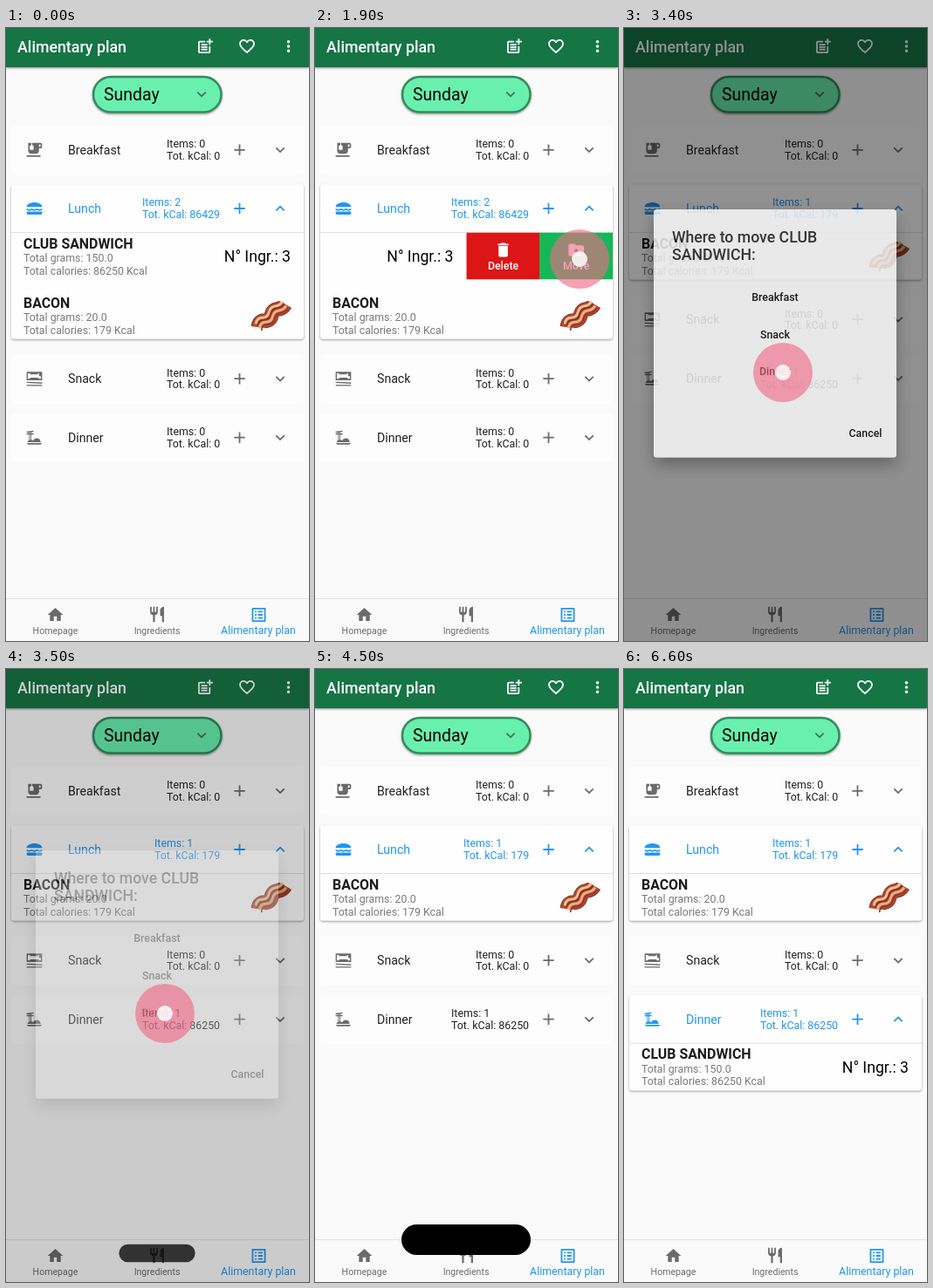
These frames come from a looping animation (347x703 px, 6.7 s). An HTML page:

```html
<!DOCTYPE html>
<html lang="en">
<head>
<meta charset="utf-8">
<title>Alimentary plan</title>
<style>
  html, body { margin: 0; width: 100%; height: 100%; overflow: hidden; background: #fafafa; }
  svg { display: block; }
  text { font-family: Roboto, sans-serif; font-size: 12.37px; fill: currentColor; }
  .medium { font-weight: 500; }
  .name { font-weight: 700; font-size: 15.9px; fill: #1c1c1c; }
  .big { font-size: 17.67px; }
  .label { font-size: 14.14px; }
  .note { fill: #7a7a7a; }
  .nav { font-size: 10.6px; }
  .mid { text-anchor: middle; }
  .end { text-anchor: end; }
</style>
</head>
<body>
<svg id="stage" width="347" height="703" viewBox="0 0 347 703"></svg>
<script>
const LOOP = 6700, STEP = 100, ROW = 68;
const BLUE = '#2196f3', GREY = '#6b6b6b', DARK = '#212121';

const PATHS = {
  home: 'M10 20v-6h4v6h5v-8h3L12 3 2 12h3v8z',
  cutlery: 'M11 9H9V2H7v7H5V2H3v7c0 2.12 1.66 3.84 3.75 3.97V22h2.5v-9.03C11.34 12.84 13 11.12 13 9V2h-2zM16 6v8h2.5v8H21V2c-2.76 0-5 2.24-5 4z',
  list: 'M19 5v14H5V5zM20.1 3H3.9c-.5 0-.9.4-.9.9v16.2c0 .4.4.9.9.9h16.2c.4 0 .9-.5.9-.9V3.9c0-.5-.5-.9-.9-.9zM11 7h6v2h-6zM11 11h6v2h-6zM11 15h6v2h-6zM7 7h2v2H7zM7 11h2v2H7zM7 15h2v2H7z',
  post: 'M17 19H5V7h7V5H5c-1.1 0-2 .9-2 2v12c0 1.1.9 2 2 2h12c1.1 0 2-.9 2-2v-7h-2zM19 2h-2v3h-3v2h3v3h2V7h3V5h-3zM7 9h8v2H7zM7 12h8v2H7zM7 15h8v2H7z',
  heart: 'M16.5 3c-1.74 0-3.41.81-4.5 2.09C10.91 3.81 9.24 3 7.5 3 4.42 3 2 5.42 2 8.5c0 3.78 3.4 6.86 8.55 11.54L12 21.35l1.45-1.32C18.6 15.36 22 12.28 22 8.5 22 5.42 19.58 3 16.5 3zM12 18.65C7.14 14.24 4 11.39 4 8.5 4 6.5 5.5 5 7.5 5c1.54 0 3.04.99 3.57 2.36h1.87C13.46 5.99 14.96 5 16.5 5c2 0 3.5 1.5 3.5 3.5 0 2.89-3.14 5.74-8 10.15z',
  dots: 'M10 6a2 2 0 1 0 4 0a2 2 0 1 0-4 0zM10 12a2 2 0 1 0 4 0a2 2 0 1 0-4 0zM10 18a2 2 0 1 0 4 0a2 2 0 1 0-4 0z',
  cup: 'M20 3H9v2.4l1.81 1.45c.12.09.19.24.19.39v4.26c0 .28-.22.5-.5.5h-4c-.28 0-.5-.22-.5-.5V7.24c0-.15.07-.3.19-.39L8 5.4V3H4v10c0 2.21 1.79 4 4 4h6c2.21 0 4-1.79 4-4v-3h2c1.1 0 2-.9 2-2V5c0-1.1-.9-2-2-2zM20 8h-2V5h2zM2 19h18v2H2z',
  burger: 'M22 10c.3-3.3-4.3-6-10-6S1.7 6.7 2 10zM2 16h20v2c0 1.1-.9 2-2 2H4c-1.1 0-2-.9-2-2zM2 12c1.700 0 1.700 1 3.300 1s1.700-1 3.400-1 1.700 1 3.300 1 1.700-1 3.300-1 1.700 1 3.400 1 1.700-1 3.300-1v2c-1.700 0-1.700 1-3.300 1s-1.700-1-3.400-1-1.700 1-3.300 1-1.700-1-3.300-1-1.700 1-3.400 1-1.700-1-3.300-1z',
  snack: 'M2 3h20v11H2zM3.500 5v7H6l1-1.500h10l1 1.500h2.500V9L18 8.500V5H17l-1 1.500H7L6 5zM2 16l20 1v1.500L2 17.500zM2 20h20v1.500H2z',
  dinner: 'M2 19h20l-2 2H4zM3 18c.2-1.300.9-2.100 2-2.600V8H2V6.500h3V5.500H2V4l9-1v1.500l-3 .4v1.600h3V8H8v7c1 .1 1.700.5 2.400 1.100C11.200 14.200 13.200 13 15.500 13c2.500 0 4.500 2 4.500 4.500v.5zM6 5.300v1.200h1V5.200zM6 8v7h1V8z',
  plus: 'M19 13h-6v6h-2v-6H5v-2h6V5h2v6h6z',
  chevron: 'M16.59 8.59L12 13.17 7.41 8.59 6 10l6 6 6-6z',
  bin: 'M6 19c0 1.1.9 2 2 2h8c1.1 0 2-.9 2-2V7H6zM19 4h-3.5l-1-1h-5l-1 1H5v2h14z',
  folder: 'M20 6h-8l-2-2H4c-1.1 0-2 .9-2 2v12c0 1.1.9 2 2 2h16c1.1 0 2-.9 2-2V8c0-1.1-.9-2-2-2zM11 17v-3H8.500L12 10l3.500 4H13v3z'
};

const icon = (name, x, y, color = 'currentColor', size = 21.2) =>
  `<path d="${PATHS[name]}" fill="${color}" fill-rule="evenodd"
    transform="translate(${x} ${y}) scale(${size / 24}) translate(-12 -12)"/>`;
const text = (x, y, str, cls = '', extra = '') =>
  `<text x="${x}" y="${y}" class="${cls}" ${extra}>${str}</text>`;

const BACON = `
  <g transform="translate(304 27) rotate(-39)" fill="none" stroke-linejoin="round">
    ${[['#7d2f22', 17, 0], ['#b8492f', 15, 0], ['#efc093', 3, -4.5], ['#8c3324', 2, -1.5], ['#e9b184', 3, 2], ['#8f3726', 1.5, 5.500]]
      .map(([c, w, dy]) => `<path d="M-20 ${dy + 1}q5-5 10-1t10 0 10-1 10 1" stroke="${c}" stroke-width="${w}"/>`).join('')}
  </g>`;

// Coordinates inside a row start at the row's top edge.
const rowText = (name, grams, kcal) =>
  text(20, 18.2, name, 'name') +
  text(20, 33.8, `Total grams: ${grams}`, 'note') +
  text(20, 48, `Total calories: ${kcal} Kcal`, 'note');
const CLUB = rowText('CLUB SANDWICH', '150.0', '86250') +
  text(326, 33.7, 'N° Ingr.: 3', 'big end', `fill="${DARK}"`);
const action = (x, color, glyph, label) =>
  `<g transform="translate(${x} 0)" color="#fff"><rect width="84" height="54" fill="${color}"/>` +
  icon(glyph, 42, 20) + text(42, 42, label, 'medium mid') + '</g>';

// Coordinates inside a meal start at the centre line of its heading.
const heading = (id, label, glyph, x, items, kcal) => `
  <g id="${id}Icons" color="${GREY}">${icon(glyph, 32.5, 0)}${icon('plus', 267.5, 0)}
    <g id="${id}Chevron" transform="translate(314 0)">${icon('chevron', 0, 0)}</g></g>
  <g id="${id}Text" color="${DARK}">${text(71, 5, label, 'label')}
    <text id="${id}Items" x="${x}" y="-2.700">Items: ${items}</text>
    <text id="${id}Kcal" x="${x}" y="11.300">Tot. kCal: ${kcal}</text></g>`;
const flatCard = '<rect x="6" y="-27.500" width="335" height="55.500" rx="3.500" fill="#fdfdfd"/>';
const openCard = id => `<g id="${id}Card"><rect id="${id}Box" x="6" y="-27.500" width="335" height="109" rx="3.500"
  fill="#fefefe" filter="url(#lift)"/><path d="M6 27.500h335" stroke="#e0e0e0"/></g>`;
const option = (x, y, label) => text(x, y, label, 'medium mid', `fill="${BLUE}"`);

const stage = document.getElementById('stage');
stage.innerHTML = `
  <defs>
    <filter id="lift" x="-5%" y="-5%" width="110%" height="115%"><feDropShadow dx="0" dy="1.200" stdDeviation="1.200" flood-opacity=".4"/></filter>
    <filter id="float" x="-20%" y="-20%" width="140%" height="150%"><feDropShadow dx="0" dy="9" stdDeviation="9" flood-opacity=".35"/></filter>
    <clipPath id="rowClip"><rect x="6" y="0" width="335" height="54"/></clipPath>
    <clipPath id="dinnerClip"><rect id="dinnerReveal" x="6" y="0" width="335" height="0"/></clipPath>
  </defs>
  <rect width="347" height="703" fill="#fafafa"/>
  <rect width="347" height="45" fill="#187445" filter="url(#lift)"/>
  <g color="#fff">${text(13, 27.6, 'Alimentary plan', 'medium', 'style="font-size:17.800px"')}
    ${icon('post', 228, 21)}${icon('heart', 276, 21)}${icon('dots', 323.5, 21)}</g>

  <rect x="100" y="56" width="146.500" height="40.500" rx="20.250" fill="#69f0ae" stroke="#358b5d" stroke-width="2.500" filter="url(#lift)"/>
  ${text(112, 82.5, 'Sunday', '', `fill="${DARK}" style="font-size:19.440px"`)}
  ${icon('chevron', 224, 76, '#4b6f5d')}

  <g transform="translate(0 139.800)">${flatCard}${heading('breakfast', 'Breakfast', 'cup', 184, 0, 0)}</g>

  <g transform="translate(0 207)">${openCard('lunch')}${heading('lunch', 'Lunch', 'burger', 156, 2, 86429)}
    <g id="clubRow" transform="translate(0 27.500)" clip-path="url(#rowClip)"><g id="swipe">${CLUB}
      ${action(341, '#dc1517', 'bin', 'Delete')}${action(424.7, '#15b757', 'folder', 'Move')}</g></g>
    <g id="baconRow">${rowText('BACON', '20.0', '179')}${BACON}</g></g>

  <g id="snack">${flatCard}${heading('snack', 'Snack', 'snack', 184, 0, 0)}</g>

  <g id="dinner">${flatCard}${openCard('dinner')}${heading('dinner', 'Dinner', 'dinner', 184, 0, 0)}
    <g transform="translate(0 27.500)" clip-path="url(#dinnerClip)">${CLUB}</g></g>

  <rect y="654" width="347" height="49" fill="#fafafa"/><path d="M0 654.500h347" stroke="#e4e4e4"/>
  <g color="${GREY}">${icon('home', 56.5, 673)}${icon('cutlery', 173, 672.5)}
    ${text(56.5, 695, 'Homepage', 'nav mid')}${text(173, 695, 'Ingredients', 'nav mid')}</g>
  <g color="${BLUE}">${icon('list', 289.5, 673)}${text(289, 694.7, 'Alimentary plan', 'mid')}</g>

  <rect id="dim" width="347" height="703"/>
  <g id="dialog"><rect x="34" y="208" width="278" height="284.500" rx="3.500" fill="#fff" filter="url(#float)"/>
    <g color="${DARK}">${text(55, 246, 'Where to move CLUB', 'medium big')}${text(55, 266.3, 'SANDWICH:', 'medium big')}</g>
    ${option(173, 313.3, 'Breakfast')}${option(173, 355.6, 'Snack')}${option(173, 398.2, 'Dinner')}${option(276.5, 468.8, 'Cancel')}</g>

  <g id="toast"><rect x="-74" y="-17.500" width="148" height="35" rx="17.500"/>
    ${text(0, 4.6, 'Move to Dinner done!', 'mid', 'fill="#fff"')}</g>
  <g id="touch"><circle r="34" fill="#f26987" opacity=".62"/><circle r="9" fill="#fff" opacity=".85"/></g>`;

const parts = {};
stage.querySelectorAll('[id]').forEach(el => parts[el.id] = el);
const set = (id, attrs) => {
  for (const key in attrs) parts[id].setAttribute(key, attrs[key]);
};
const move = (id, x, y, more = '') => set(id, { transform: `translate(${x} ${y}) ${more}` });

// Linear track through [time, value] keys; two keys at one time make a hard jump.
function track(t, ...keys) {
  const next = keys.findIndex(key => key[0] > t);
  if (next === 0) return keys[0][1];
  if (next < 0) return keys[keys.length - 1][1];
  const [t0, v0] = keys[next - 1], [t1, v1] = keys[next];
  return v0 + (v1 - v0) * (t - t0) / (t1 - t0);
}
const blend = (from, to, k) => `rgb(${from.map((v, i) => Math.round(v + (to[i] - v) * k))})`;

function meals(t) {
  const moved = t >= 3400;
  const open = track(t, [5400, 0], [5500, .7], [5600, 1]);
  const tint = track(t, [5400, 0], [5700, 1]);
  const lunchX = moved ? 170 : 156, dinnerX = moved ? 156 : 184;

  set('lunchBox', { height: 109 + (moved ? 0 : ROW) });
  set('lunchIcons', { color: BLUE });
  set('lunchText', { color: BLUE });
  move('lunchChevron', 314, 0, 'rotate(180)');
  set('lunchItems', { x: lunchX });
  set('lunchKcal', { x: lunchX });
  parts.lunchItems.textContent = `Items: ${moved ? 1 : 2}`;
  parts.lunchKcal.textContent = `Tot. kCal: ${moved ? 179 : 86429}`;

  set('clubRow', { visibility: moved ? 'hidden' : 'visible' });
  move('swipe', -167.5 * track(t, [1000, 0], [1100, .08], [1200, .35], [1400, .85], [1600, 1], [2000, 1], [2100, .6], [2300, 0]), 0);
  move('baconRow', 0, 27.5 + (moved ? 0 : ROW));
  move('snack', 0, 402.2 - (moved ? ROW : 0));
  move('dinner', 0, 469.7 - (moved ? ROW : 0));

  set('dinnerItems', { x: dinnerX });
  set('dinnerKcal', { x: dinnerX });
  parts.dinnerItems.textContent = `Items: ${moved ? 1 : 0}`;
  parts.dinnerKcal.textContent = `Tot. kCal: ${moved ? 86250 : 0}`;
  set('dinnerCard', { opacity: open });
  set('dinnerBox', { height: 55 + 54 * open });
  set('dinnerReveal', { height: 54 * open });
  set('dinnerText', { color: blend([33, 33, 33], [33, 150, 243], tint) });
  set('dinnerIcons', { color: blend([107, 107, 107], [33, 150, 243], open) });
  move('dinnerChevron', 314, 0, `rotate(${180 * open})`);
}

function overlays(t) {
  set('dim', { opacity: .54 * track(t, [2000, 0], [2100, .6], [2200, 1], [3300, 1], [3400, .8], [3500, .35], [3600, 0]) });
  set('dialog', { opacity: track(t, [2000, 0], [2100, .6], [2200, 1], [3300, 1], [3400, .8], [3500, .27], [3600, 0]) });

  const size = track(t, [3400, .4], [3500, .59], [3600, .92], [3700, 1], [5500, 1], [5600, .91], [5700, .8]);
  const drop = track(t, [3400, 22], [3500, 15.5], [3600, 3], [3700, 0], [5500, 0], [5600, 2.5], [5700, 6]);
  move('toast', 173, 654.5 + drop, `scale(${size})`);
  set('toast', { opacity: track(t, [3400, 0], [3500, .75], [3600, 1], [5500, 1], [5600, .18], [5700, 0]) });

  const x = track(t, [1000, 285], [1100, 268], [1200, 222], [1400, 138], [1600, 112],
    [1700, 112], [1700, 303], [2500, 303], [2500, 182], [4500, 182], [4500, 314]);
  const y = track(t, [1700, 262], [1700, 265], [2500, 265], [2500, 395], [4500, 395], [4500, 402]);
  move('touch', x, y);
  set('touch', { opacity: track(t, [1000, 0], [1000, 1], [1500, 1], [1600, 0],
    [1800, 0], [1800, 1], [1900, 1], [2000, 0],
    [3100, 0], [3100, 1], [3500, 1], [3600, 0],
    [5300, 0], [5300, 1], [5400, 1], [5500, 0]) });
}

const start = performance.now();
function frame() {
  const elapsed = (performance.now() - start + STEP / 4) % LOOP;
  const t = Math.floor(elapsed / STEP) * STEP;
  meals(t);
  overlays(t);
  requestAnimationFrame(frame);
}
frame();
</script>
</body>
</html>
```
